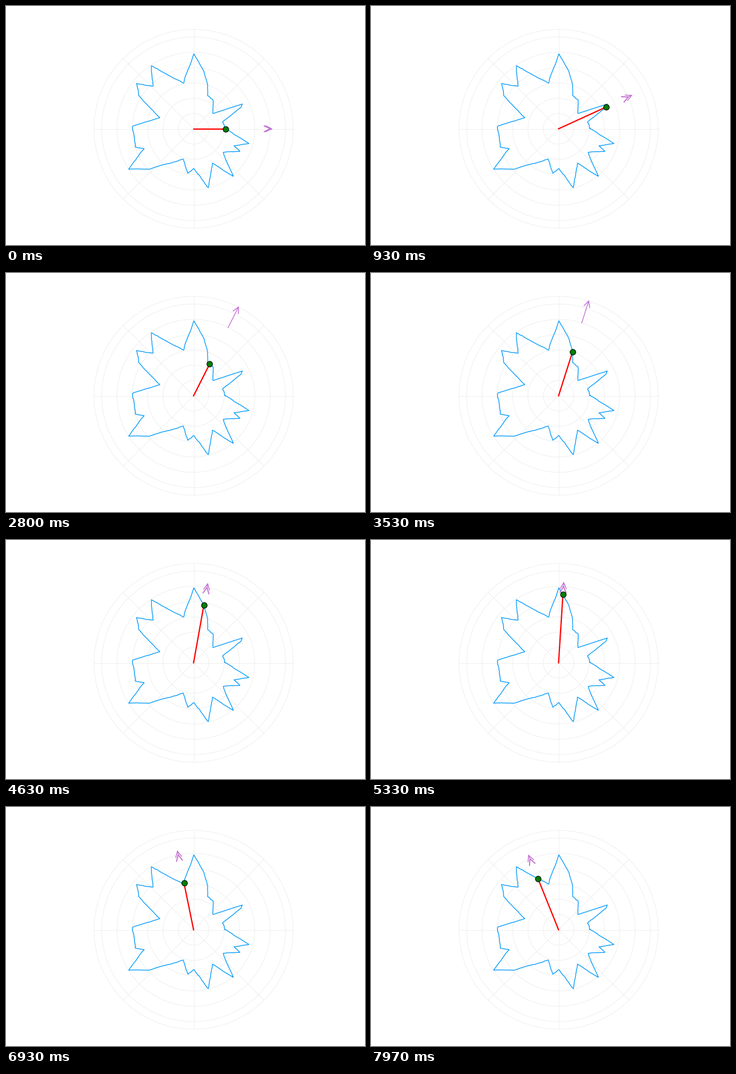
Write a matplotlib script that moves like this. It is 600 px wide and 400 px high and loops after 8 s.

```python
import numpy as np
import matplotlib.pyplot as plt
from matplotlib.animation import FuncAnimation

W, H = 600, 400
FRAMES, LOOP_MS = 240, 8000
CX, CY = 313.5, 205.5
UNIT = 25.6                      # pixels per radial unit
R_MAX, R_ARROW = 6.5 * UNIT, 5 * UNIT
PX = 0.72                        # points per pixel at 100 dpi

BLUE, ORCHID, GRID = "#009afa", "#c271d2", "#f0f0f0"

# tips and notches of the outline, counter-clockwise from the right
CORNERS = np.array([
    (366, 205), (362, 194), (393, 169), (395, 164), (346, 180), (346, 157),
    (337, 150), (337, 132), (331, 110), (314, 80), (297, 129), (279, 120),
    (243, 100), (246, 134), (218, 130), (222, 150), (257, 187), (212, 201),
    (216, 236), (231, 239), (205, 273), (240, 273), (296, 256), (304, 280),
    (314, 272), (338, 304), (345, 263), (380, 285), (363, 245), (391, 243),
    (381, 234), (406, 230)], float)

# heading in degrees at a few key steps
STEPS = [0, 27, 63, 105, 138, 179, 239]
HEADING = [0, 24.6, 54, 72.4, 79.9, 92.5, 111.9]


def polar(r, deg):
    a = np.radians(deg)
    return CX + r * np.cos(a), CY - r * np.sin(a)


def outline():
    """Join the corners by random-walk edges; return radius and angle."""
    rng = np.random.default_rng(4)
    xy, rough = [], []
    for a, b in zip(CORNERS, np.roll(CORNERS, -1, axis=0)):
        n = max(2, int(np.hypot(*(b - a)) / 2))
        t = np.arange(n) / n
        xy.append(a + np.outer(t, b - a))
        walk = np.cumsum(rng.normal(0, 0.4, n + 1))
        rough.append(walk[:n] - walk[0] - t * (walk[n] - walk[0]))
    x, y = np.vstack(xy).T
    r = np.hypot(x - CX, y - CY) + np.concatenate(rough)
    return r, np.degrees(np.arctan2(CY - y, x - CX)) % 360


def chevron(r, deg, size=11, spread=26.5):
    """Open arrow head with its tip at (r, deg)."""
    x, y = polar(r, deg)
    a = np.radians([deg - spread, deg + spread])
    wx, wy = x - size * np.cos(a), y + size * np.sin(a)
    return [wx[0], x, wx[1]], [wy[0], y, wy[1]]


fig = plt.figure(figsize=(W / 100, H / 100), dpi=100, facecolor="white")
ax = fig.add_axes([0, 0, 1, 1])
ax.set_xlim(0, W)
ax.set_ylim(H, 0)
ax.axis("off")

turn = np.linspace(0, 360, 361)
for radius in [k * UNIT for k in range(1, 7)] + [R_MAX]:
    ax.plot(*polar(radius, turn), color=GRID, lw=PX, zorder=1)
for deg in range(0, 180, 45):
    ax.plot(*polar(np.array([-R_MAX, R_MAX]), deg), color=GRID, lw=PX,
            zorder=1)

edge_r, edge_deg = outline()
ax.plot(*polar(np.append(edge_r, edge_r[0]), np.append(edge_deg, edge_deg[0])),
        color=BLUE, lw=1.25 * PX, solid_joinstyle="round", zorder=2)

style = dict(color=ORCHID, solid_joinstyle="miter", zorder=3)
shaft, = ax.plot([], [], lw=1.3 * PX, **style)
head, = ax.plot([], [], lw=1.4 * PX, **style)
tail, = ax.plot([], [], lw=1.8 * PX, **style)
needle, = ax.plot([], [], color="red", lw=2.1 * PX, zorder=4)
dot, = ax.plot([], [], "o", ms=9.4 * PX, mfc="green", mec="black",
               mew=PX, zorder=5)


def update(i):
    deg = np.interp(i, STEPS, HEADING)
    r = np.interp(deg, edge_deg, edge_r, period=360)
    x, y = polar(r, deg)
    needle.set_data([CX, x], [CY, y])
    dot.set_data([x], [y])

    # the arrow grows with the radius and now and then shoots to the rim
    burst = i % 22 in (17, 18)
    tip = R_MAX if burst else R_ARROW + np.clip((r - 46) * 0.35, 0, 6.4)
    shaft.set_data(*polar(np.array([R_ARROW, tip]), deg))
    head.set_data(*chevron(tip, deg))
    tail.set_data(*chevron(R_ARROW, deg))
    tail.set_visible(not burst)
    return shaft, head, tail, needle, dot


anim = FuncAnimation(fig, update, frames=FRAMES, interval=LOOP_MS / FRAMES,
                     repeat=True, repeat_delay=0, blit=False)
plt.show()
```
